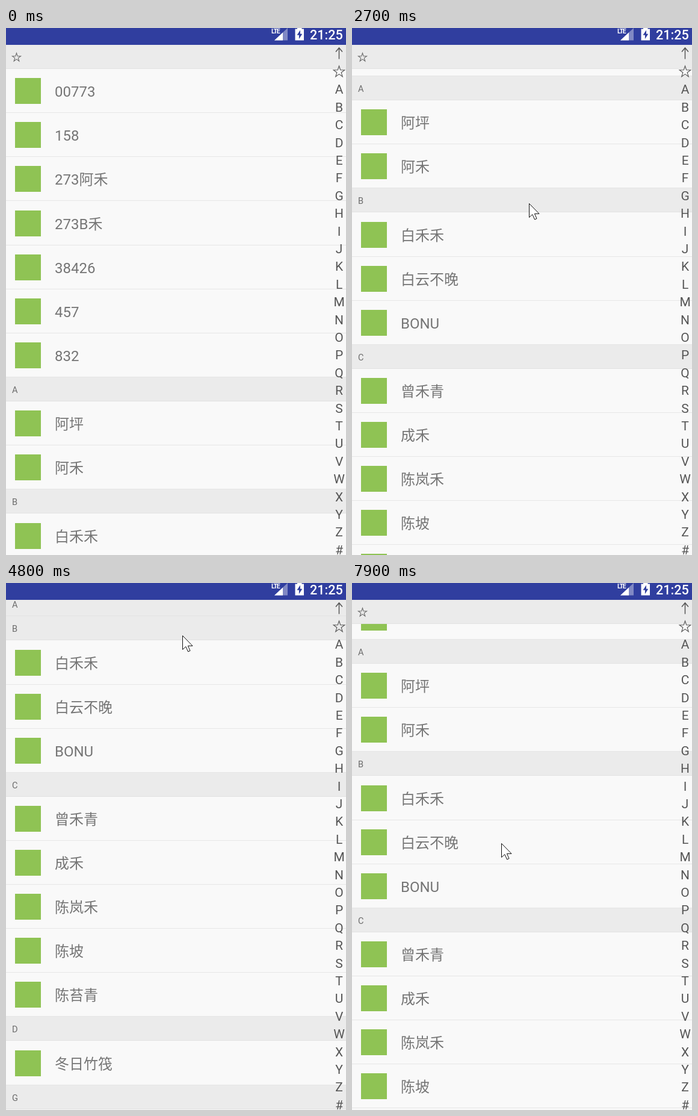
Write an HTML page that moves like this. It is 565 px wide and 875 px high and loops after 8 s.

```html
<!DOCTYPE html>
<html lang="zh">
<head>
<meta charset="utf-8">
<title>Contacts</title>
<style>
html, body { margin: 0; width: 100%; height: 100%; overflow: hidden; background: #f9f9f9; }
svg { display: block; width: 565px; height: 875px; }
text { font-family: Roboto, "Noto Sans CJK SC", "Noto Sans CJK", sans-serif; }
.name { font-size: 24px; fill: #757575; }
.head { font-size: 14.6px; fill: #6c6c6c; }
.side { font-size: 21px; fill: #555; text-anchor: middle; }
.clock { font-size: 21.6px; font-weight: 500; fill: #fff; }
.lte { font-size: 10.5px; font-weight: 700; letter-spacing: -1.2px; fill: #fff; }
</style>
</head>
<body>
<svg viewBox="0 0 565 875">
  <rect width="565" height="875" fill="#f9f9f9"/>
  <g id="rows"></g>
  <g id="heads"></g>
  <g id="side"></g>
  <g>
    <rect width="565" height="28" fill="#303e9f"/>
    <path d="M468 0V20.5H446Z" fill="#8088c4"/>
    <path d="M460 7.5V20.5H446Z" fill="#fff"/>
    <text class="lte" x="441" y="8.5">LTE</text>
    <path d="M480.5 1.5H484V0H491.5V1.5H495V20.5H480.5Z" fill="#fff"/>
    <path d="M489 3.5L483.5 11.8H486.9V18.2L492.3 9.7H489Z" fill="#303e9f"/>
    <text class="clock" x="505" y="18.8">21:25</text>
  </g>
  <path id="cursor" d="M.5 .5V23.5L5.8 18.6L9.6 27L13 25.5L9.4 17.4H17Z" fill="#fff" stroke="#111" stroke-linejoin="round"/>
</svg>
<script>
const NS = 'http://www.w3.org/2000/svg';
const LOOP = 8000, STEP = 100, TOP = 28, HEAD_H = 40.2, ROW_H = 73.1;

const sections = [
  ['☆', '00773', '158', '273阿禾', '273B禾', '38426', '457', '832'],
  ['A', '阿坪', '阿禾'],
  ['B', '白禾禾', '白云不晚', 'BONU'],
  ['C', '曾禾青', '成禾', '陈岚禾', '陈坡', '陈苔青'],
  ['D', '冬日竹筏'],
  ['G', '古岭']
];

// List offset at a few moments: one drag up, a rest, one drag back down
const scrollPoints = [
  [850, 0], [1600, 103], [2700, 500], [4000, 628], [4800, 711],
  [5300, 741], [5900, 741], [6800, 681], [8000, 467.5]
];
const GRAB_UP = 806, GRAB_DOWN = 899; // pointer y plus list offset stays constant
const LAG = 100;                      // the list trails the pointer

const $ = id => document.getElementById(id);

function add(parent, tag, attrs = {}, text = '') {
  const el = document.createElementNS(NS, tag);
  for (const k in attrs) el.setAttribute(k, attrs[k]);
  if (text) el.textContent = text;
  parent.appendChild(el);
  return el;
}

function star(parent, cx, cy, r, stroke) {
  const points = Array.from({ length: 10 }, (_, i) => {
    const a = i * Math.PI / 5, q = i % 2 ? r * 0.39 : r;
    return `${cx + q * Math.sin(a)},${cy - q * Math.cos(a)}`;
  });
  add(parent, 'polygon', { points: points.join(' '), fill: 'none', stroke, 'stroke-width': 1.1 });
}

function makeRow(name) {
  const g = add($('rows'), 'g');
  add(g, 'rect', { x: 15, y: 15, width: 43, height: 43, fill: '#8fc354' });
  add(g, 'text', { class: 'name', x: 81, y: 45.5 }, name);
  add(g, 'rect', { y: 72, width: 565, height: 1, fill: '#e6e6e6' });
  return g;
}

function makeHead(label) {
  const g = add($('heads'), 'g');
  add(g, 'rect', { width: 565, height: 40, fill: '#ebebeb' });
  add(g, 'rect', { y: 39, width: 565, height: 1, fill: '#e2e2e2' });
  if (label === '☆') star(g, 17.5, 21, 7.4, '#6c6c6c');
  else add(g, 'text', { class: 'head', x: 10, y: 25.7 }, label);
  return g;
}

const rows = [], heads = [];
let y = TOP;
for (const [label, ...names] of sections) {
  heads.push({ el: makeHead(label), y });
  y += HEAD_H;
  for (const name of names) {
    rows.push({ el: makeRow(name), y });
    y += ROW_H;
  }
}

add($('side'), 'path', { d: 'M553.5 51.5V33.5M548 39.5L553.5 33L559 39.5', fill: 'none', stroke: '#555', 'stroke-width': 1.5 });
star($('side'), 553.5, 72.8, 9.8, '#555');
[...'ABCDEFGHIJKLMNOPQRSTUVWXYZ#'].forEach((c, i) =>
  add($('side'), 'text', { class: 'side', x: 553.6, y: 109.4 + i * 29.4 }, c));

// Monotone cubic through the points
function smoothCurve(pts) {
  const last = pts.length - 1;
  const slope = i => (pts[i + 1][1] - pts[i][1]) / (pts[i + 1][0] - pts[i][0]);
  const tangents = pts.map((_, i) => {
    if (i === 0) return 0;
    if (i === last) return slope(i - 1);
    const a = slope(i - 1), b = slope(i);
    return a * b > 0 ? 2 * a * b / (a + b) : 0;
  });
  return t => {
    if (t <= pts[0][0]) return pts[0][1];
    if (t >= pts[last][0]) return pts[last][1];
    const i = pts.findIndex(p => p[0] > t) - 1;
    const [t0, v0] = pts[i], [t1, v1] = pts[i + 1];
    const h = t1 - t0, p = (t - t0) / h, q = 1 - p;
    return q * q * ((1 + 2 * p) * v0 + p * h * tangents[i])
         + p * p * ((1 + 2 * q) * v1 - q * h * tangents[i + 1]);
  };
}

const scroll = smoothCurve(scrollPoints);
const mix = (a, b, p) => a + (b - a) * p;
const ease = (t, from, to) => {
  const p = Math.min(1, Math.max(0, (t - from) / (to - from)));
  return p * p * (3 - 2 * p);
};

function pointer(t) {
  const up = GRAB_UP - scroll(t + LAG), down = GRAB_DOWN - scroll(t + LAG);
  const upX = 292 + up * 0.008, downX = 273 - down * 0.058;
  const enter = ease(t, 100, 700), shift = ease(t, 5400, 5800);
  return [
    mix(mix(527, upX, enter), downX, shift),
    mix(mix(183, up, enter), down, shift)
  ];
}

const move = (el, x, y) => el.setAttribute('transform', `translate(${Math.round(x)} ${Math.round(y)})`);

function draw(t) {
  const offset = scroll(t);
  for (const r of rows) move(r.el, 0, r.y - offset);
  heads.forEach((h, i) => {
    const next = heads[i + 1];
    const pinned = Math.max(TOP, h.y - offset);
    move(h.el, 0, next ? Math.min(pinned, next.y - offset - HEAD_H) : pinned);
  });
  move($('cursor'), ...pointer(t));
  $('cursor').setAttribute('visibility', t < 100 ? 'hidden' : 'visible');
}

const start = performance.now();
function tick() {
  const t = (performance.now() - start) % LOOP;
  draw(Math.floor(t / STEP) * STEP);
  requestAnimationFrame(tick);
}
tick();
</script>
</body>
</html>
```
